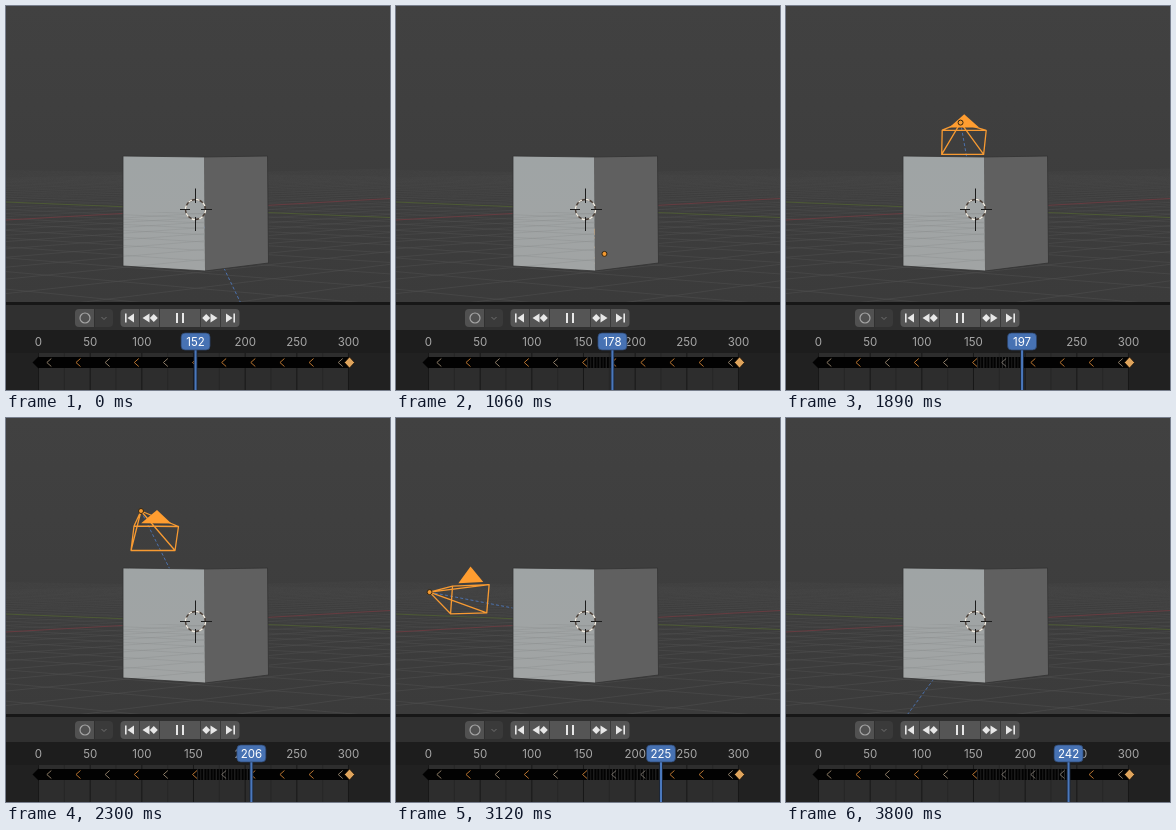
Write an HTML page that moves like this. It is 384 px wide and 384 px high and loops after 3.87 s.

```html
<!DOCTYPE html>
<html>
<head>
<meta charset="utf-8">
<style>
html, body { margin: 0; width: 100%; height: 100%; overflow: hidden; background: #3d3d3d; }
svg { display: block; width: 100vw; height: 100vh; }
text { font: 11.5px Inter, "DejaVu Sans", sans-serif; text-anchor: middle; }
</style>
</head>
<body>
<svg id="stage" viewBox="0 0 384 384">
  <defs>
    <linearGradient id="sky" x2="0" y2="1">
      <stop offset="0" stop-color="#414141"/><stop offset="1" stop-color="#3b3b3b"/>
    </linearGradient>
    <linearGradient id="lit" x2="0" y2="1">
      <stop offset="0" stop-color="#9fa4a5"/><stop offset="1" stop-color="#a1a4a4"/>
    </linearGradient>
    <clipPath id="view"><path d="M0 0H384V296H0z"/></clipPath>
    <clipPath id="floor"><path d="M117 206L198 206L199 265L117 260z"/></clipPath>
  </defs>

  <g clip-path="url(#view)">
    <path d="M0 0H384V296H0z" fill="url(#sky)"/>
    <g id="grid" stroke="#515151" fill="none"></g>
    <path d="M0 196L384 211.5" stroke="#4d5a35"/>
    <path d="M0 214L384 192.5" stroke="#673c41"/>
    <path id="track" stroke="#4b71ad" stroke-dasharray="3 2.2" fill="none"/>
    <g stroke="#f79a32" stroke-width="1.3" stroke-linejoin="round" fill="none">
      <path id="wire"/>
      <path id="up" fill="#ff9d30" stroke="none"/>
    </g>
    <path d="M198 151L261.500 150L262.500 257L199 265z" fill="#606060"/>
    <path d="M117 150L198 151L199 265L117 260z" fill="url(#lit)"/>
    <g id="stripes" clip-path="url(#floor)" stroke="#858888" fill="none"></g>
    <path d="M117 150L198 151L261.500 150L262.500 257L199 265L117 260z" fill="none" stroke="#333" stroke-width=".8"/>
    <circle id="dot" r="2.5" fill="#f59a30" stroke="#33240f"/>
    <circle cx="189.500" cy="203.500" r="10" fill="none" stroke="#4c4038" stroke-width="1.3"/>
    <circle cx="189.500" cy="203.500" r="10" fill="none" stroke="#f2eee4" stroke-width="1.5" stroke-dasharray="3.900 3.950"/>
    <path d="M189.500 182.500V197M189.500 211V225M174 203.500H184M195 203.500H206" stroke="#1d1d1d" fill="none"/>
  </g>

  <path d="M0 296H384V300H0z" fill="#171717"/>
  <path d="M0 299H384V324H0z" fill="#303030"/>
  <path d="M0 324H384V347H0z" fill="#1d1d1d"/>
  <path d="M0 347H384V384H0z" fill="#212121"/>
  <path d="M32.500 347H343V384H32.500z" fill="#2d2d2d"/>

  <path d="M73 303H88V321H73q-4 0-4-4V307q0-4 4-4z" fill="#515151"/>
  <path d="M89 303H103q4 0 4 4V317q0 4-4 4H89z" fill="#3a3a3a"/>
  <circle cx="79" cy="312" r="5" fill="none" stroke="#a5a5a5" stroke-width="1.2"/>
  <path d="M95.500 311L98 313.500L100.500 311" fill="none" stroke="#6f6f6f"/>
  <rect x="114.500" y="303" width="119" height="18" rx="4" fill="#555"/>
  <path d="M133.500 303V321M153.500 303V321M194.500 303V321M214.500 303V321" stroke="#3a3a3a"/>
  <g fill="#e8e8e8">
    <path id="skip" d="M119 307.500h1.600v9H119zM128 307.500v9l-6.500-4.500z"/>
    <path id="jump" d="M143.500 307.500v9l-7-4.500zM147.800 308l4 4l-4 4l-4-4z"/>
    <use href="#skip" transform="matrix(-1 0 0 1 348 0)"/>
    <use href="#jump" transform="matrix(-1 0 0 1 348 0)"/>
    <path d="M170 307h2v10h-2zM176 307h2v10h-2z"/>
  </g>

  <g id="lines"></g>
  <path d="M32.500 351H343V362H32.500z" fill="#020202"/>
  <path d="M32.500 350.500l6 6l-6 6l-6-6z" fill="#020202"/>
  <g id="ticks"></g>
  <g id="marks" fill="none" stroke-width="1"></g>
  <path d="M343.500 351l5 5.500l-5 5.500l-5-5.500z" fill="#dfa45c" stroke="#1a1208" stroke-width=".7"/>
  <g id="ruler" fill="#a8a8a8"></g>
  <g id="head">
    <path d="M-1.900 343H1.900V384H-1.900z" fill="#1b2638"/>
    <path d="M-1 343H1V384H-1z" fill="#4a78bd"/>
    <rect x="-14.500" y="327" width="29" height="17" rx="4" fill="#4772b3" stroke="#2b4368" stroke-width=".7"/>
    <text id="count" y="339.500" fill="#fff"></text>
  </g>
</svg>
<script>
const $ = id => document.getElementById(id);
const LOOP = 3870;
const xOf = f => 32.5 + f * 1.0333;

function add(parent, tag, attrs, text) {
  const el = document.createElementNS('http://www.w3.org/2000/svg', tag);
  for (const k in attrs) el.setAttribute(k, attrs[k]);
  if (text !== undefined) el.textContent = text;
  $(parent).append(el);
  return el;
}

// Floor lines run to two far vanishing points on the horizon
for (let n = -24; n <= 11; n++) {
  if (!n) continue;
  const y = 140 + 64 / (1 - n * 0.055);
  for (const vx of [-1436, 1345]) {
    const ex = vx < 0 ? 384 : 0;
    const ey = 140 + (y - 140) * (ex - vx) / (190 - vx);
    const d = `M${vx} 140L${ex} ${ey}`;
    add('grid', 'path', { d, opacity: Math.min(0.5, (y - 140) / 180) });
    add('stripes', 'path', { d, opacity: 0.3 });
  }
}

for (let f = 0; f <= 300; f += 25) {
  const major = f % 50 === 0;
  add('lines', 'path', { d: `M${xOf(f)} 347V384`, stroke: major ? '#181818' : '#262626' });
  if (major) add('ruler', 'text', { x: xOf(f), y: 339.5 }, f);
}

const marks = [];
for (let i = 0; i < 11; i++) {
  const f = 10 + i * 28.2, x = xOf(f);
  const el = add('marks', 'path', { d: `M${x + 2.5} 352.500L${x - 2} 356.500L${x + 2.5} 360.500` });
  marks.push({ f, el, tone: i < 5 && i % 2 === 0 || i === 10 ? '#8b7b66' : '#b87430' });
}

const ticks = [];
for (let f = 154; f < 242; f += 3) {
  const el = add('ticks', 'path', { d: `M${xOf(f)} 351V362`, stroke: f % 2 ? '#1c1c1c' : '#2a2a2a' });
  ticks.push({ f, el });
}

// Step number -> timeline frame
const COUNT = [[0, 152], [9, 166], [23, 189], [34, 206], [42, 219], [51, 233], [56, 242]];
function frameAt(t) {
  const s = Math.floor(t < 70 ? 0 : t < 580 ? 1 + (t - 70) / 63.75 : 9.02 + (t - 580) / 68.5);
  let i = 0;
  while (i < COUNT.length - 2 && s >= COUNT[i + 1][0]) i++;
  const [a, fa] = COUNT[i], [b, fb] = COUNT[i + 1];
  return Math.min(242, Math.round(fa + (fb - fa) * (s - a) / (b - a)));
}

// Each pose: pivot, four frame corners clockwise from top left, arrow tip
const POSES = [
  [289, 410, 255, 368, 303, 368, 301, 398, 257, 398, 279, 345],
  [220, 350, 195, 322, 243, 322, 241, 350, 196, 350, 219, 304],
  [198, 158, 174, 154, 218, 154, 216, 178, 175, 178, 195.5, 138],
  [135, 93, 128, 108, 172.5, 108.5, 169, 132.5, 125, 132.5, 151, 92],
  [66, 159.5, 80, 157.5, 120, 156, 116, 184, 75.5, 184.5, 99, 138],
  [7, 197, 37, 185, 70.5, 183.5, 70, 212, 38, 213.5, 54.5, 165],
  [50, 393, 78, 345, 126, 345, 124, 378, 80, 378, 102, 315]
];
const keyF = i => COUNT[i][1];
const slope = (i, k) => (POSES[i + 1][k] - POSES[i][k]) / (keyF(i + 1) - keyF(i));
function tangent(i, k) {
  if (i === 0) return slope(0, k);
  if (i === POSES.length - 1) return slope(i - 1, k);
  const a = slope(i - 1, k), b = slope(i, k);
  return a * b <= 0 ? 0 : 2 * a * b / (a + b);
}
function poseAt(f) {
  let i = 0;
  while (i < POSES.length - 2 && f >= keyF(i + 1)) i++;
  const h = keyF(i + 1) - keyF(i), u = (f - keyF(i)) / h, v = 1 - u;
  return POSES[i].map((p, k) =>
    p * (1 + 2 * u) * v * v + POSES[i + 1][k] * u * u * (3 - 2 * u) +
    h * u * v * (v * tangent(i, k) - u * tangent(i + 1, k)));
}

function draw(t) {
  const f = frameAt(t);
  const [px, py, ax, ay, bx, by, cx, cy, dx, dy, tx, ty] = poseAt(f);
  const P = `M${px} ${py}L`;
  $('track').setAttribute('d', `${P}190 204`);
  $('wire').setAttribute('d', `M${ax} ${ay}L${bx} ${by}L${cx} ${cy}L${dx} ${dy}z` +
    `${P}${ax} ${ay}${P}${bx} ${by}${P}${cx} ${cy}${P}${dx} ${dy}`);
  const base = u => `${ax + (bx - ax) * u} ${ay + (by - ay) * u - 2.8}`;
  $('up').setAttribute('d', `M${tx} ${ty}L${base(0.84)}L${base(0.16)}z`);
  $('dot').setAttribute('cx', px);
  $('dot').setAttribute('cy', py);

  $('head').setAttribute('transform', `translate(${xOf(f)} 0)`);
  $('count').textContent = f;
  for (const m of marks) m.el.setAttribute('stroke', m.f > 152 && m.f < f ? '#77716a' : m.tone);
  for (const k of ticks) k.el.setAttribute('visibility', k.f < f ? 'visible' : 'hidden');
}

const start = performance.now();
function loop() {
  draw((performance.now() - start) % LOOP);
  requestAnimationFrame(loop);
}
loop();
</script>
</body>
</html>
```
